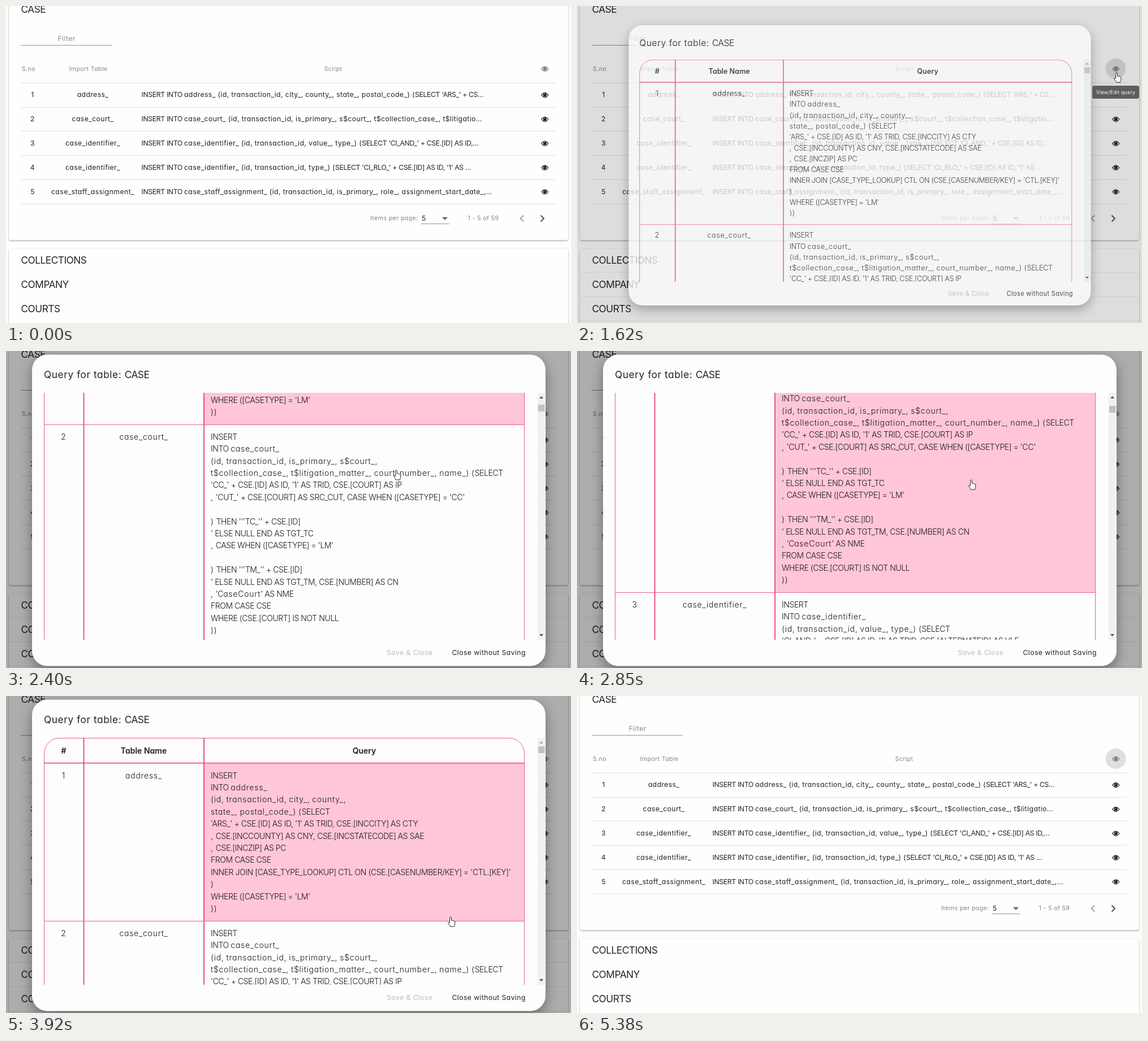
These frames come from a looping animation (999 by 561 pixels, 6.12 s). An HTML page:

```html
<!DOCTYPE html>
<html lang="en">
<head>
<meta charset="utf-8">
<title>Query dialog</title>
<style>
html, body { margin: 0; width: 100%; height: 100%; overflow: hidden; background: #fefefe; }
svg { display: block; width: 100vw; height: 100vh; }
text { font: 400 12.25px Inter, "Open Sans", sans-serif; font-feature-settings: "cv11"; letter-spacing: .032em; fill: #242424; white-space: pre; }
.mid { text-anchor: middle; }
.h { font-size: 17.3px; }
.s { font-size: 10.7px; fill: #858585; }
.q { font-size: 14px; font-weight: 350; letter-spacing: .054em; word-spacing: -.05em; fill: #181818; }
.th { font-size: 14px; font-weight: 600; letter-spacing: 0; fill: #1c1c1c; }
.cap { letter-spacing: -.03em; word-spacing: 0; }
.off { fill: #bdbdbd; }
.grey { fill: #8c8c8c; }
.tip { font-size: 8.7px; fill: #fff; }
.panel { fill: #fefefe; filter: drop-shadow(0 1px 1.2px rgba(0,0,0,.42)); }
.card { fill: #fdfdfd; filter: drop-shadow(0 8px 11px rgba(0,0,0,.38)); }
.rule { stroke: #e0e0e0; }
.pink { fill: none; stroke: #ee5a8e; }
.col { stroke: #ea3f7c; stroke-width: 1.8; }
</style>
</head>
<body>
<svg id="stage" viewBox="0 0 999 561" preserveAspectRatio="none"></svg>
<script>
const LOOP = 6120, LINE = 21.4;

const $ = id => document.getElementById(id);
const esc = s => s.replace(/&/g, '&amp;').replace(/</g, '&lt;');
// Runs of capitals are set a little tighter than lower case.
const runs = s => s.split(/([A-Z'[][^a-z]*[A-Z][^a-z]*)/)
  .map((p, i) => i % 2 ? `<tspan class="cap">${esc(p)}</tspan>` : esc(p)).join('');
const text = (x, y, s, cls = '') => `<text x="${x}" y="${y}" class="${cls}">${runs(s)}</text>`;
const line = (x1, y1, x2, y2, cls) => `<path d="M${x1} ${y1}L${x2} ${y2}" class="${cls}"/>`;
const eye = (y, c) => `<g transform="translate(952.7 ${y})">
  <path d="M-6 0Q0-8 6 0Q0 8-6 0z" fill="none" stroke="${c}" stroke-width="1.1"/>
  <circle r="3.1" cy="-.3" fill="${c}"/><path d="M-1.6-.6A1.7 1.7 0 0 1 0-2.1" fill="none" stroke="#fff" stroke-width=".7"/></g>`;

const imports = [
  ['address_', "INSERT INTO address_ (id, transaction_id, city_, county_, state_, postal_code_) (SELECT 'ARS_' + CS…"],
  ['case_court_', 'INSERT INTO case_court_ (id, transaction_id, is_primary_, s$court_, t$collection_case_, t$litigatio…'],
  ['case_identifier_', "INSERT INTO case_identifier_ (id, transaction_id, value_, type_) (SELECT 'CI_AND_' + CSE.[ID] AS ID,…"],
  ['case_identifier_', "INSERT INTO case_identifier_ (id, transaction_id, type_) (SELECT 'CI_RLO_' + CSE.[ID] AS ID, '1' AS …"],
  ['case_staff_assignment_', 'INSERT INTO case_staff_assignment_ (id, transaction_id, is_primary_, role_, assignment_start_date_,…']
];

const queries = [
  ['address_', `INSERT
INTO address_
(id, transaction_id, city_, county_,
state_, postal_code_) (SELECT
'ARS_' + CSE.[ID] AS ID, '1' AS TRID, CSE.[INCCITY] AS CTY
, CSE.[INCCOUNTY] AS CNY, CSE.[INCSTATECODE] AS SAE
, CSE.[INCZIP] AS PC
FROM CASE CSE
INNER JOIN [CASE_TYPE_LOOKUP] CTL ON (CSE.[CASENUMBER/KEY] = 'CTL.[KEY]'
)
WHERE ([CASETYPE] = 'LM'
))`],
  ['case_court_', `INSERT
INTO case_court_
(id, transaction_id, is_primary_, s$court_,
t$collection_case_, t$litigation_matter_, court_number_, name_) (SELECT
'CC_' + CSE.[ID] AS ID, '1' AS TRID, CSE.[COURT] AS IP
, 'CUT_' + CSE.[COURT] AS SRC_CUT, CASE WHEN ([CASETYPE] = 'CC'

) THEN '''TC_'' + CSE.[ID]
' ELSE NULL END AS TGT_TC
, CASE WHEN ([CASETYPE] = 'LM'

) THEN '''TM_'' + CSE.[ID]
' ELSE NULL END AS TGT_TM, CSE.[NUMBER] AS CN
, 'CaseCourt' AS NME
FROM CASE CSE
WHERE (CSE.[COURT] IS NOT NULL
))`],
  ['case_identifier_', `INSERT
INTO case_identifier_
(id, transaction_id, value_, type_) (SELECT
'CI_AND_' + CSE.[ID] AS ID, '1' AS TRID, CSE.[ALTERNATEID] AS VLE
FROM CASE CSE
))`]
];

function page() {
  let s = `<rect x="5" y="-20" width="989" height="434.5" rx="4" class="panel"/>
    <rect x="5" y="429.5" width="989" height="160" rx="4" class="panel"/>`;
  s += text(26.5, 12, 'CASE', 'h') + text(91.5, 61.5, 'Filter', 'grey') +
    `<path d="M26 69.5H187" stroke="#949494"/>`;
  s += text(28, 114.5, 'S.no', 's') + text(111.5, 114.5, 'Import Table', 's') + text(562.5, 114.5, 'Script', 's');
  s += `<circle id="halo" cx="952.5" cy="110.8" r="18" fill="#000" fill-opacity=".12"/>` + eye(111.3, '#777');
  imports.forEach(([name, sql], i) => {
    const y = 157 + i * 42.85, edge = Math.round(y - 21.3) + .2;
    s += line(26, edge, 972, edge, 'rule') +
      text(47, y + 4.4, String(i + 1), 'mid') + text(153.5, y + 4.4, name, 'mid') +
      text(239.5, y + 4.4, sql) + eye(y + .6, '#1e1e1e');
  });
  s += line(26, 350.2, 972, 350.2, 'rule');
  s += text(644, 379.3, 'Items per page:', 's') + text(735, 379.8, '5') + text(816.5, 379.3, '1 - 5 of 59', 's') +
    `<path d="M734 385.5H784" stroke="#949494"/><path d="M771 373.7h10l-5 5z" fill="#666"/>
    <g fill="none" stroke-width="1.9"><path d="M915 370.5l-5.5 5.5 5.5 5.5" stroke="#a3a3a3"/>
    <path d="M945.5 370.5l5.5 5.5-5.5 5.5" stroke="#505050"/></g>`;
  ['COLLECTIONS', 'COMPANY', 'COURTS'].forEach((name, i) => {
    s += text(26.5, 456.2 + i * 42.8, name, 'h');
  });
  return s + `<path id="seams" d="M5 471.5H994M5 514.5H994M5 557.5H994" stroke="#000" stroke-opacity=".09"/>`;
}

function dialog() {
  let top = 119, rows = '', cells = '';
  queries.forEach(([name, sql], i) => {
    const lines = sql.split('\n'), h = lines.length * LINE + 22.3;
    cells += `<rect id="cell${i}" x="350" y="${top}" width="567" height="${h}" fill="#ffc6d8"/>`;
    rows += text(102, top + 26.6, String(i + 1), 'q mid') + text(243.5, top + 26.6, name, 'q mid');
    lines.forEach((l, k) => { if (l) rows += text(362, top + 26.6 + k * LINE, l, 'q'); });
    top += h;
    const edge = Math.round(top) + .4;
    rows += line(67, edge, 917, edge, 'pink');
  });
  return `<rect x="46" y="6.5" width="908" height="551" rx="27" class="card"/>` +
    text(67, 48, 'Query for table: CASE', 'h') +
    `<clipPath id="view"><rect x="60" y="74" width="880" height="437"/></clipPath>
    <g clip-path="url(#view)"><g id="sheet">${cells}
      <path class="pink" d="M67.5 ${top}V101.5a27 27 0 0 1 27-27H889.5a27 27 0 0 1 27 27V${top}M67 118H917M67 119.4H917"/>
      ${line(137.5, 74, 137.5, top, 'col') + line(350, 74, 350, top, 'col')}
      ${text(102, 101.5, '#', 'th mid') + text(243.5, 101.5, 'Table Name', 'th mid') + text(633.5, 101.5, 'Query', 'th mid')}
      ${rows}</g></g>
    <rect x="940" y="74" width="13" height="437" fill="#f1f1f1"/>
    <rect id="thumb" x="941" y="89" width="11.5" height="12" fill="#c1c1c1"/>
    <path id="up" d="M943 84l3.5-4 3.5 4z"/><path d="M943 501l3.5 4 3.5-4z" fill="#505050"/>
    <rect id="press" x="774" y="518.5" width="158.5" height="31.5" rx="15.7" fill="#f4f4f4"/>` +
    text(673, 538.3, 'Save & Close', 'off') + text(788.5, 538.3, 'Close without Saving');
}

$('stage').innerHTML = `<rect width="999" height="561" fill="#fdfdfd"/>${page()}
  <rect id="shade" width="999" height="561"/>
  <g id="dialog">${dialog()}</g>
  <g id="tip"><rect x="911" y="141" width="83" height="23" rx="3.5" fill="#585858" fill-opacity=".95"/>${text(918, 155.8, 'View/Edit query', 'tip')}</g>
  <circle id="click" cx="891" cy="535" r="9" fill="#f6e92c" fill-opacity=".75"/>
  <path id="hand" fill="#fff" stroke="#222" stroke-linejoin="round" d="M-1.4 10.3V1.4a1.4 1.4 0 0 1 2.8 0V6.2c1-.6 2-.3 2.3.4 1-.4 1.9 0 2.2.7 1.2-.3 2 .3 2 1.5v3.2c0 2-1.3 2.8-1.3 5H-.4c0-1.6-3-4.2-3.8-6.1-.5-1.4 1.2-1.8 2-.8z"/>`;

// Each step run: begin, end, number of steps, values reached.
const tracks = {
  hand: [[996, 495], [80, 630, 6, 954, 118], [1780, 2080, 4, 690, 211], [2850, 3170, 4, 734, 321],
    [3270, 3410, 2, 786, 391], [4030, 4480, 5, 903, 520], [4600, 4601, 1, 892, 530]],
  scroll: [[0], [2400, 2401, 1, 268], [2500, 2600, 2, 357], [3270, 3271, 1, 268], [3410, 3610, 3, 0]],
  tip: [[0], [750, 1070, 4, 1], [1780, 1880, 2, 0]],
  shade: [[0], [1430, 1620, 3, .13], [1780, 1980, 3, .32], [4940, 5380, 5, 0]],
  dialog: [[0, .7], [1430, 1620, 3, .76, .9], [1780, 1880, 2, 1, 1], [4940, 5040, 2, 0, 1]]
};
const hovers = [[0, -1], [2080, 0], [2710, 1], [3610, 0], [4030, 1], [4360, -1]];

function sample([start, ...segs], t) {
  let v = start;
  for (const [a, b, n, ...to] of segs) {
    if (t < a) break;
    const k = Math.min(n, 1 + Math.floor((t - a) / (b - a) * (n - 1) + 1e-6)), p = k / n;
    const e = p * p * (3 - 2 * p);
    v = v.map((x, i) => x + (to[i] - x) * e);
  }
  return v;
}

const set = (id, name, v) => $(id).setAttribute(name, v);
const show = (id, on) => set(id, 'visibility', on ? 'visible' : 'hidden');

function draw(t) {
  const [x, y] = sample(tracks.hand, t), [scroll] = sample(tracks.scroll, t);
  const [shade] = sample(tracks.shade, t), [alpha, scale] = sample(tracks.dialog, t);
  const row = hovers.filter(h => h[0] <= t).pop()[1];
  set('hand', 'transform', `translate(${x} ${y})`);
  show('hand', t >= 80 && t < 5190);
  show('halo', t >= 630 && t < 1880 || t >= 5190);
  set('tip', 'opacity', sample(tracks.tip, t)[0]);
  set('shade', 'opacity', shade);
  set('seams', 'opacity', Math.min(1, shade * 6));
  set('dialog', 'opacity', alpha);
  set('dialog', 'transform', `translate(499.5 282) scale(${scale}) translate(-499.5 -282)`);
  set('dialog', 'display', alpha ? 'inline' : 'none');
  set('sheet', 'transform', `translate(0 ${-scroll})`);
  set('thumb', 'y', 89 + scroll * .0224);
  set('up', 'fill', scroll ? '#505050' : '#a3a3a3');
  queries.forEach((q, i) => set('cell' + i, 'opacity', i === row ? 1 : 0));
  set('press', 'opacity', t >= 4480 ? 1 : 0);
  show('click', t >= 4810 && t < 4940);
}

function tick() {
  draw(performance.now() % LOOP);
  requestAnimationFrame(tick);
}
tick();
</script>
</body>
</html>
```
